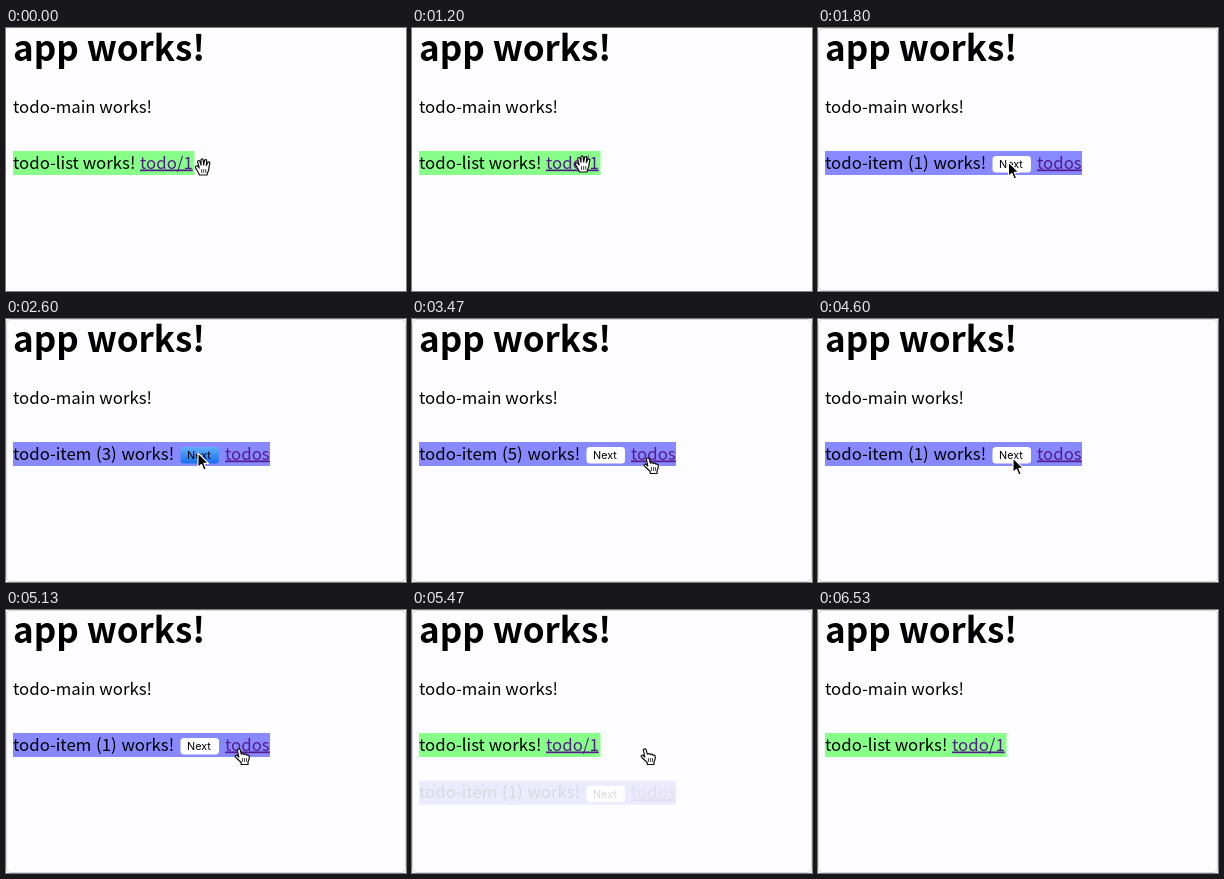
These frames come from a looping animation (400 by 263 pixels, 6590 ms). An HTML page:

```html
<!DOCTYPE html>
<html lang="en">
<head>
<meta charset="utf-8">
<title>Todo routes</title>
<style>
  html, body { margin: 0; width: 100%; height: 100%; overflow: hidden; background: #fdfcfe; }
  svg { display: block; width: 100vw; height: 100vh; }
  text { font: 16.8px "Noto Sans CJK JP", "Noto Sans CJK SC", "Noto Sans CJK", "Noto Sans", sans-serif; fill: #000; white-space: pre; }
  .title { font-size: 35px; font-weight: 700; }
  .link { fill: #551a8b; text-decoration: underline; }
  .label { font: 10.8px Inter, "Liberation Sans", sans-serif; }
  .hand { fill: #fff; stroke: #111; stroke-width: 1.2; stroke-linejoin: round; stroke-linecap: round; }
  .arrow { fill: #000; stroke: #fff; stroke-width: 1.1; stroke-linejoin: round; }
</style>
</head>
<body>
<svg viewBox="0 0 400 263">
  <defs>
    <linearGradient id="blue" x2="0" y2="1">
      <stop offset="0" stop-color="#62aef8"/>
      <stop offset="1" stop-color="#176ff0"/>
    </linearGradient>
  </defs>
  <rect width="400" height="263" fill="#fdfcfe"/>
  <rect id="border" x=".5" y=".5" width="399" height="262" rx="4" fill="none" stroke="#d4d3d6"/>

  <text class="title" x="7" y="33">app works!</text>
  <text x="7" y="84.5">todo-main works!</text>

  <g id="list">
    <rect x="7" y="123" width="181.5" height="24" fill="#88ff88"/>
    <text x="7" y="140.5">todo-list works!</text>
    <text class="link" x="134" y="140.5">todo/1</text>
  </g>

  <g id="item">
    <rect x="7" y="123" width="257" height="24" fill="#8888ff"/>
    <text x="7" y="140.5" style="word-spacing:1px">todo-item (<tspan id="count">1</tspan>) works!</text>
    <rect id="button" x="174.5" y="128" width="38.5" height="16.5" rx="3.5"/>
    <text class="label" x="181" y="140.3">Next</text>
    <text class="link" x="219" y="140.5">todos</text>
  </g>

  <g id="cursor">
    <g id="open" class="hand">
      <path d="M-3.5 8C-4 6-7 2-7.5.5C-8-1-6-1.8-4.6 0L-3.8 1C-4.2-1-5.2-4-5.4-5.2C-5.4-6.8-3.6-7-3-5.4L-2-1.8V-7C-1.9-8.6 0-8.6.2-7L.6-2L1.6-6.6C2-8 3.8-7.6 3.7-6.2L3.3-1.4L4.8-4.4C5.6-5.8 7.2-5 6.8-3.6C6.2-1.5 6 1 5.6 3C5.2 5 4.2 6 4 8Z"/>
      <path d="M-1.4 2.5V5.5M.7 2.5V5.5M2.8 2.5V5.5" stroke-width=".8"/>
    </g>
    <g id="point" class="hand">
      <path d="M-1.7.8C-1.5-.5.8-.6 1.2.8L2.3 5.2C3 4.2 4.8 4.4 5.2 5.6C6 4.8 7.6 5 8 6.3C9 5.8 10.3 6.4 10.3 8C10.5 10.5 9.3 11.5 9 13V15.5H2.2V13.5C.8 12-1.8 10-3.6 7.8C-4.6 6.4-2.6 5.4-1.2 7L-.2 8Z"/>
      <path d="M3.4 9.5V12.5M5.4 9.5V12.5M7.4 9.5V12.5" stroke-width=".8"/>
    </g>
    <path id="arrow" class="arrow" d="M0 0V14.5L3.4 11.3L5.8 17L8.2 16L5.8 10.4H10.4Z"/>
  </g>
</svg>
<script>
const LOOP = 6590, STEP = 200 / 3;
const ENTER_MS = 200, LEAVE_MS = 300, ITEM_WIDTH = 257;

// Each visit to the item page: entering and leaving times
const visits = [[1395, 3795], [4328, 5260]];
// Button presses: down and up
const presses = [[1930, 2060], [2195, 2325], [2530, 2660], [2795, 2925]];
// Cursor: time, x, y, shape from then on
const moves = [
  [0, 197, 139, 'open'],
  [725, 197, 139, 'open'],
  [1060, 171, 136, 'open'],
  [1395, 171, 136, 'arrow'],
  [1500, 171, 134, 'arrow'],
  [1860, 192, 134, 'arrow'],
  [2990, 192, 134, 'arrow'],
  [3200, 222, 138, 'point'],
  [3400, 236, 139, 'point'],
  [3860, 236, 139, 'point'],
  [4190, 168, 134, 'point'],
  [4328, 168, 134, 'arrow'],
  [4580, 195, 139, 'arrow'],
  [4725, 195, 139, 'arrow'],
  [4900, 221, 139, 'point'],
  [5050, 233, 139, 'point'],
  [5520, 233, 139, 'arrow'],
  [5860, 294, 142, 'arrow'],
  [5925, 294, 142, '']
];

const $ = id => document.getElementById(id);
const show = (id, on) => $(id).setAttribute('display', on ? 'inline' : 'none');
const clamp = x => Math.max(0, Math.min(1, x));
const easeIn = x => clamp(x) ** 1.7;
const easeOut = x => 1 - (1 - clamp(x)) ** 1.7;
const easeBoth = x => x * x * (3 - 2 * x);

function place(id, x, y, opacity = 1) {
  $(id).setAttribute('transform', `translate(${x} ${y})`);
  $(id).setAttribute('opacity', opacity);
}

function drawPages(t) {
  const visit = visits.find(([from, to]) => t >= from && t < to + LEAVE_MS);
  show('item', visit);
  show('list', !visits.some(([from, to]) => t >= from && t < to));
  if (!visit) return;

  const [from, to] = visit;
  if (t < to) {
    const p = easeIn((t - from) / ENTER_MS);
    place('item', -ITEM_WIDTH * (1 - p), 0, p);
  } else {
    const p = easeOut((t - to) / LEAVE_MS);
    place('item', 0, 27 + 24 * p, 1 - p);
  }
  $('count').textContent = 1 + presses.filter(([, up]) => up >= from && up <= t).length;
  const down = presses.some(([a, b]) => t >= a && t < b);
  $('button').setAttribute('fill', down ? 'url(#blue)' : '#fff');
}

function drawCursor(t) {
  const i = moves.findLastIndex(move => move[0] <= t);
  const [t0, x0, y0, shape] = moves[i];
  const [t1, x1, y1] = moves[i + 1] || [LOOP, x0, y0];
  const p = easeBoth(clamp((t - t0) / (t1 - t0)));
  place('cursor', x0 + (x1 - x0) * p, y0 + (y1 - y0) * p);
  for (const id of ['open', 'point', 'arrow']) show(id, id === shape);
}

function draw(now) {
  const t = Math.floor((now % LOOP) / STEP + 0.01) * STEP;
  show('border', t >= 1325);
  drawPages(t);
  drawCursor(t);
}

const start = performance.now();
function tick() {
  draw(performance.now() - start);
  requestAnimationFrame(tick);
}
tick();
</script>
</body>
</html>
```
